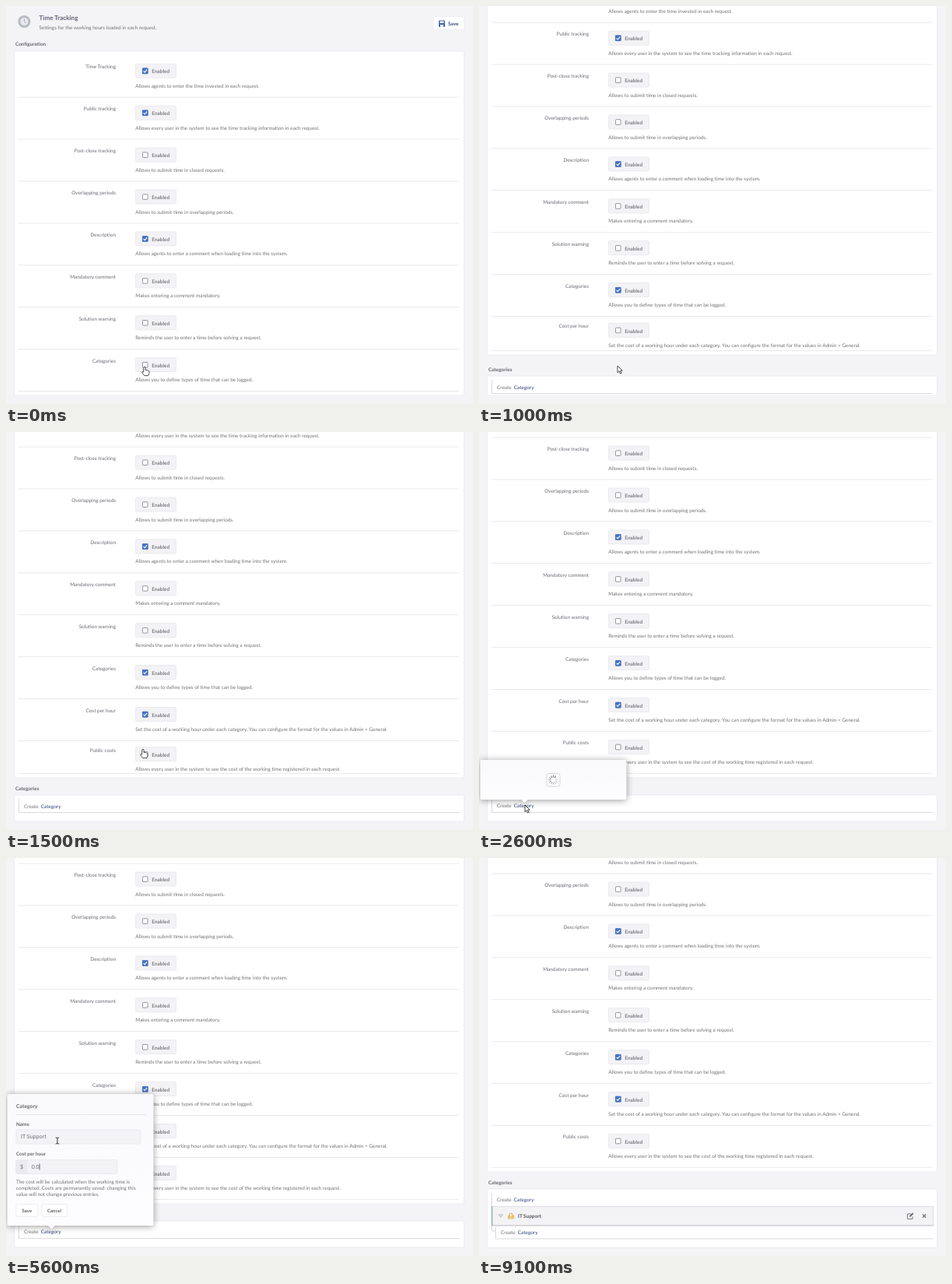
These frames come from a looping animation (600 px wide and 511 px high, 10000 ms). An HTML page:

```html
<!DOCTYPE html>
<html lang="en">
<head>
<meta charset="utf-8">
<title>Time tracking settings</title>
<style>
  html, body { margin: 0; width: 100%; height: 100%; overflow: hidden; background: #f4f3f5; }
  #stage { display: block; width: 100vw; height: 100vh; }
  text { font: 6.42px Lato, sans-serif; fill: #727276; text-rendering: geometricPrecision; }
  .label { text-anchor: end; fill: #6b6b74; }
  .bold { font-weight: 700; fill: #68686e; }
  .title { font-size: 8.1px; font-weight: 700; fill: #62627c; }
  .link { fill: #33427a; }
  .field { font-size: 7.15px; fill: #6c6c72; }
  .action { font-size: 6px; font-weight: 700; fill: #5c5c62; }
  .card { fill: #fff; stroke: #ecebef; }
  .rule { stroke: #e9e9ec; fill: none; }
  .tree { stroke: #d9d8dd; fill: none; }
  .input { fill: #f3f2f5; stroke: #ebeaee; }
  .button { fill: #fff; stroke: #eeedf1; }
  #popup { filter: drop-shadow(0 1px 4px rgba(0, 0, 0, .4)); }
</style>
</head>
<body>
<svg id="stage" viewBox="0 0 600 511"></svg>
<script>
const LOOP = 10000, TICK = 100, PITCH = 53.9, FIRST_ROW = 63.3, STAGE_H = 511;
const POPUP_BOTTOM = 472, LIST_GROWTH = 41.5;

const rows = [
  ['Time Tracking', 'Allows agents to enter the time invested in each request.', 0],
  ['Public tracking', 'Allows every user in the system to see the time tracking information in each request.', 0],
  ['Post-close tracking', 'Allows to submit time in closed requests.'],
  ['Overlapping periods', 'Allows to submit time in overlapping periods.'],
  ['Description', 'Allows agents to enter a comment when loading time into the system.', 0],
  ['Mandatory comment', 'Makes entering a comment mandatory.'],
  ['Solution warning', 'Reminds the user to enter a time before solving a request.'],
  ['Categories', 'Allows you to define types of time that can be logged.', 700],
  ['Cost per hour', 'Set the cost of a working hour under each category. You can configure the format for the values in Admin > General.', 1200],
  ['Public costs', 'Allows every user in the system to see the cost of the working time registered in each request.']
];

// Step tables: [time, value]
const nameSteps = [[0, ''], [3400, 'I'], [3500, 'IT'], [3600, 'IT '], [3800, 'IT S'], [4200, 'IT Su'],
  [4400, 'IT Sup'], [4600, 'IT Supp'], [4800, 'IT Suppor'], [5000, 'IT Support']];
const costSteps = [[0, '0'], [5200, '0.00'], [5600, '0.0'], [5800, '0'], [6100, ''], [6200, '1.00'],
  [6400, '10.00'], [6700, '100.00']];
const caretSteps = [[0, ''], [3300, 'name'], [5200, 'cost'], [7300, ''], [8000, 'cost'], [8500, '']];
const popupSteps = [[0, 0, 0], [2400, .5, 51], [2500, 1, 51], [2700, 1, 112], [2800, 1, 169],
  [8700, .5, 169], [8800, 0, 169]];
const pointerSteps = [[0, 178, 463, 'hand'], [800, 178, 462, 'arrow'], [1000, 178, 462, 'arrow'],
  [1200, 177, 409, 'hand'], [1300, 176, 407, 'hand'], [1600, 176, 407, 'hand'], [1700, 149, 430, 'arrow'],
  [2200, 59, 479, 'arrow'], [2900, 59, 479, 'arrow'], [3200, 66, 363, 'beam'], [7300, 66, 363, 'beam'],
  [7400, 68, 400, 'beam'], [7500, 68, 400, 'arrow'], [7800, 26, 450, 'hand'], [8700, 26, 450, 'none']];

const stage = document.getElementById('stage');

function add(parent, tag, attrs = {}, content) {
  const node = document.createElementNS('http://www.w3.org/2000/svg', tag);
  set(node, attrs);
  if (content !== undefined) node.textContent = content;
  parent.appendChild(node);
  return node;
}
function set(node, attrs) {
  for (const key in attrs) node.setAttribute(key, attrs[key]);
}
const text = (parent, x, middle, content, cls = '') =>
  add(parent, 'text', { x, y: middle + 2.3, class: cls }, content);
const box = (parent, x, y, width, height, cls, rx = 1.5) =>
  add(parent, 'rect', { x, y, width, height, rx, class: cls });
const path = (parent, d, attrs = {}) => add(parent, 'path', { d, ...attrs });
const stroke = (color, width = 1) => ({ fill: 'none', stroke: color, 'stroke-width': width });
const move = (node, x, y) => node.setAttribute('transform', `translate(${x} ${y})`);
const show = (node, visible) => node.setAttribute('visibility', visible ? 'inherit' : 'hidden');

function stepAt(steps, t) {
  let current = steps[0];
  for (const step of steps) if (step[0] <= t) current = step;
  return current;
}
function swing(t, start, duration = 400) {
  const p = Math.min(1, Math.max(0, (t - start) / duration));
  return .5 - Math.cos(p * Math.PI) / 2;
}

const page = add(stage, 'g');

// Header
add(page, 'circle', { cx: 23.5, cy: 20, r: 8, fill: '#b9bcc3' });
add(page, 'circle', { cx: 23.5, cy: 20, r: 5, fill: '#e9eaee' });
path(page, 'M23.5 16.5V20.3L25.8 21.6', stroke('#a4a8b1'));
text(page, 42.5, 15.6, 'Time Tracking', 'title');
text(page, 42.5, 27.2, 'Settings for the working hours loaded in each request.');
box(page, 549, 13.5, 39.5, 17, 'button');
box(page, 556, 18.5, 8, 8.5, '', 1).setAttribute('fill', '#3d68b8');
path(page, 'M557.5 19.5h5v2.5h-5zM558 24h4v3h-4z', { fill: '#fff' });
text(page, 568, 22.2, 'Save', 'bold').style.fill = '#3f4c70';
text(page, 12, 49, 'Configuration', 'bold');

// Settings card
const card = box(page, 10.5, 58, 578, 442, 'card', 2);
const rowViews = rows.map(([label, help, checkedAt], i) => {
  const clip = add(page, 'svg', { x: 0, y: FIRST_ROW + i * PITCH, width: 600, height: PITCH });
  const body = add(clip, 'g');
  text(body, 141, 14.8, label, 'label');
  box(body, 166.5, 11, 52, 18, 'input').setAttribute('fill', '#f4f3f5');
  add(body, 'rect', { x: 175.5, y: 16.8, width: 6.6, height: 6.6, rx: .6, fill: '#fdfdfd', stroke: '#8d8d93', 'stroke-width': .9 });
  const check = add(body, 'g');
  add(check, 'rect', { x: 175, y: 16.3, width: 7.6, height: 7.6, rx: .8, fill: '#4473c5' });
  path(check, 'M176.6 20.2l1.6 1.6 3-3.4', stroke('#fff', 1.1));
  text(body, 187.3, 20.9, 'Enabled', 'bold').style.fill = '#7a7a7f';
  text(body, 166.3, 39.2, help);
  const rule = path(page, 'M16 0H582', { class: 'rule' });
  return { clip, body, check, rule, checkedAt };
});

// Categories section
const section = add(page, 'g');
const sectionTitle = text(section, 12, 0, 'Categories', 'bold');
const listCard = box(section, 10.5, 0, 578, 34, 'card', 2);
const list = add(section, 'svg', { x: 0, y: 0, width: 600, height: 34 });
function createLink(parent, x, middle) {
  text(parent, x, middle, 'Create');
  text(parent, x + 21.8, middle, 'Category', 'link');
}
createLink(list, 23, 14.3);
const listTree = path(list, '', { class: 'tree' });
const item = add(list, 'svg', { x: 0, y: 22, width: 600, height: 0 });
box(item, 16.5, .5, 567, 24.5, '', 0).setAttribute('fill', '#f3f2f4');
path(item, 'M16 .5H583.5V25', stroke('#dddce1'));
path(item, 'M16 25H584', stroke('#c4c3c9', 1.2));
path(item, 'M16.7 0V25', stroke('#84aaa9', 1.3));
path(item, 'M25.5 11h5l-2.5 3.5z', stroke('#aaaab0', .8));
path(item, 'M37.5 16v-4h2v-2.5h3V12h2v4zM39.5 12v4M42.5 10v6M37.5 14h7', stroke('#e2ae3c', .9));
text(item, 50, 12.6, 'IT Support', 'bold').style.fill = '#55555c';
path(item, 'M555 10h-4.5v6.5h6.5v-3', stroke('#77777d'));
path(item, 'M553 14l.5-1.8 3.6-3.6 1.3 1.3-3.6 3.6z', { fill: '#66666c' });
path(item, 'M570 10.7l4.2 4.2M574.2 10.7l-4.2 4.2', stroke('#77777d', 1.4));
path(item, 'M16.5 25v7h5M21.5 27v15', { class: 'tree' });
createLink(item, 28, 33.6);

// Popup
const defs = add(stage, 'defs');
const shade = add(defs, 'linearGradient', { id: 'shade', x1: 0, y1: 0, x2: 0, y2: 1 });
add(shade, 'stop', { offset: 0, 'stop-color': '#f9f8fb' });
add(shade, 'stop', { offset: 1, 'stop-color': '#fdfcfe' });
const popup = add(stage, 'g', { id: 'popup' });
path(popup, 'M53 471l5.5 5 5.5-5z', { fill: '#fdfcfe' });
const panel = box(popup, 1.5, 0, 188, 51, '', 2);
panel.setAttribute('fill', 'url(#shade)');

const loader = add(popup, 'g');
box(loader, 87, 438.5, 17, 16.5, 'button', 3).style.stroke = '#d5d4d9';
const spokes = Array.from({ length: 12 }, (_, i) =>
  path(loader, 'M0-3.2V-6', { ...stroke('#55555b', 1), transform: `translate(95.5 446.7) rotate(${i * 30})` }));

const form = add(popup, 'g');
text(form, 13, 319, 'Category', 'bold').style.fontSize = '6.8px';
path(form, 'M13 329.5H180', { class: 'rule' });
text(form, 13, 341.6, 'Name', 'bold');
box(form, 13, 349, 160, 18, 'input');
text(form, 13, 380, 'Cost per hour', 'bold').style.fontSize = '6.3px';
box(form, 13, 387.5, 130, 18, 'input');
box(form, 13, 387.5, 14, 18, 'input').style.fill = '#ebeaee';
text(form, 18, 396.6, '$', 'field');
['The cost will be calculated when the working time is',
  'completed. Costs are permanently saved: changing this',
  'value will not change previous entries.'].forEach((line, i) => text(form, 13, 415.2 + i * 8.2, line));
box(form, 13, 444.5, 28, 16, 'button');
box(form, 46, 444.5, 32.5, 16, 'button');
text(form, 20.6, 452.2, 'Save', 'action');
text(form, 53, 452.2, 'Cancel', 'action');
const fields = {
  name: { node: text(form, 19, 358, '', 'field'), x: 19, y: 358, steps: nameSteps },
  cost: { node: text(form, 32.8, 396.5, '', 'field'), x: 32.8, y: 396.5, steps: costSteps }
};
const caret = path(form, 'M0-4V4', stroke('#333', .7));

// Pointers, with the hot spot at the origin
const ink = { fill: '#fff', stroke: '#222', 'stroke-width': .8, 'stroke-linejoin': 'round' };
const pointers = {
  arrow: path(stage, 'M0 0V8.6L2 6.8 3.4 10 4.9 9.4 3.5 6.2H6.2Z', ink),
  hand: path(stage, 'M-1.2 1Q0-1 1.1 1V4.4Q2.2 3.6 3 4.7Q4 4.2 4.6 5.3Q6 5 6 6.6V8.4L4.8 11.6H-.2L-3.4 7.6Q-3.6 6-1.2 7Z', ink),
  beam: path(stage, 'M-2.2-4Q0-4 0-3Q0-4 2.2-4M0-3V3M-2.2 4Q0 4 0 3Q0 4 2.2 4', stroke('#222', .9))
};

function layoutPage(t) {
  const growth = rows.map((_, i) => i === 8 ? swing(t, 712) : i === 9 ? swing(t, 1224) : 1);
  let y = FIRST_ROW;
  rowViews.forEach((row, i) => {
    const p = growth[i], height = PITCH * p;
    set(row.clip, { y, height });
    move(row.body, 0, -12 * (1 - p));
    y += height;
    move(row.rule, 0, y);
    show(row.clip, p > 0);
    show(row.rule, p > 0);
    show(row.check, row.checkedAt <= t);
  });
  const cardBottom = y + 5.6, hidden = 1 - growth[8], opened = growth[8] > 0;
  set(card, { height: cardBottom - 58 });

  const added = LIST_GROWTH * swing(t, 8650, 450);
  const gap = opened ? 22 + 27 * hidden : 0;
  const listHeight = opened ? Math.max(0, 34 - 49 * hidden) + added : 0;
  const top = cardBottom + gap;
  show(section, opened);
  set(sectionTitle, { y: top - 8.7 + 2.3 });
  set(listCard, { y: top, height: listHeight });
  set(list, { y: top, height: listHeight });
  set(item, { height: added });
  const end = 22.5 + added;
  set(listTree, { d: `M16.5 5V22.5M${added ? 21 : 16} ${end}H583` });

  move(page, 0, -Math.max(0, Math.round(top + listHeight + 11 - STAGE_H)));
}

function layoutPopup(t) {
  const [, opacity, height] = stepAt(popupSteps, t);
  set(popup, { opacity });
  show(popup, opacity > 0);
  set(panel, { y: POPUP_BOTTOM - height, height });
  show(loader, height === 51);
  show(form, height === 169);
  spokes.forEach((spoke, i) => set(spoke, { opacity: .25 + .75 * ((i + 12 - t / TICK % 12) % 12) / 12 }));

  for (const field of Object.values(fields)) field.node.textContent = stepAt(field.steps, t)[1];
  const active = fields[stepAt(caretSteps, t)[1]];
  show(caret, active && height === 169);
  if (active) {
    const value = active.node.textContent;
    const space = value.endsWith(' ') ? 1.4 : 0;
    move(caret, active.x + (value ? active.node.getComputedTextLength() : 0) + space + .4, active.y);
  }
}

function layoutPointer(t) {
  const from = stepAt(pointerSteps, t);
  const to = pointerSteps[pointerSteps.indexOf(from) + 1] || from;
  const p = to === from ? 0 : (t - from[0]) / (to[0] - from[0]);
  for (const kind in pointers) {
    show(pointers[kind], kind === from[3]);
    move(pointers[kind], from[1] + (to[1] - from[1]) * p, from[2] + (to[2] - from[2]) * p);
  }
}

function draw(now) {
  const t = Math.floor(now % LOOP / TICK) * TICK;
  layoutPage(t);
  layoutPopup(t);
  layoutPointer(t);
}

const start = performance.now();
function tick() {
  draw(performance.now() - start);
  requestAnimationFrame(tick);
}
tick();
</script>
</body>
</html>
```
